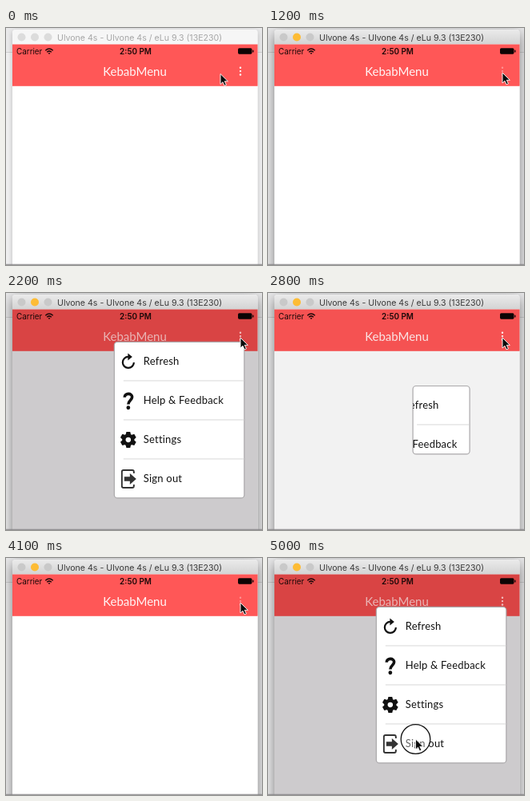
Animation, 320 px wide and 297 px high, one loop 5.1 s. Source, as an HTML page:

```html
<!DOCTYPE html>
<html lang="en">
<head>
<meta charset="utf-8">
<title>KebabMenu</title>
<style>
  html, body { margin: 0; width: 100%; height: 100%; overflow: hidden; background: #efeff0; }
  #stage { display: block; width: 100vw; height: 100vh; }
  .ui { font-family: Inter, "Liberation Sans", sans-serif; }
  .app { font-family: Lato, "Open Sans", sans-serif; }
</style>
</head>
<body>
<svg id="stage" viewBox="0 0 320 297" preserveAspectRatio="none">
  <defs>
    <linearGradient id="bar" x2="0" y2="1">
      <stop offset="0" stop-color="#ebebeb"/>
      <stop offset="1" stop-color="#d3d3d3"/>
    </linearGradient>
  </defs>

  <rect width="320" height="297" fill="#efeff0"/>
  <rect width="320" height="30" fill="#e9e9ea"/>
  <path d="M0 30.5H320" stroke="#cfcfd0"/>
  <path id="frame" d="M8 320V6Q8 2 12 2H310.500Q314.500 2 314.500 6V320Z" fill="#f6f6f6"/>
  <path id="titlebar" d="M8 20.500V6Q8 2 12 2H310.500Q314.500 2 314.500 6V20.500Z" fill="#f6f6f6"/>
  <g id="lights">
    <circle cx="19.500" cy="11.500" r="5"/>
    <circle id="mid" cx="36" cy="11.500" r="5"/>
    <circle cx="52.500" cy="11.500" r="5"/>
  </g>
  <text id="caption" class="ui" x="64" y="15.500" font-size="10.600">Ulvone 4s - Ulvone 4s / eLu 9.3 (13E230)</text>

  <rect id="page" x="8" y="72" width="306.500" height="225"/>
  <rect id="nav" x="8" y="20.500" width="306.500" height="52.300"/>
  <g class="ui" font-size="9.900" fill="#1a0808">
    <text x="13" y="32.500">Carrier</text>
    <text x="162" y="32.500" text-anchor="middle" font-weight="600">2:50 PM</text>
  </g>
  <g fill="none" stroke="#1a0808" stroke-width="1.500">
    <path d="M49.300 28.200Q54 23.800 58.700 28.200"/>
    <path d="M51.200 30.200Q54 27.600 56.800 30.200"/>
  </g>
  <path d="M52.600 31.600Q54 30.300 55.400 31.600L54 33Z" fill="#1a0808"/>
  <rect x="290" y="25.300" width="17.500" height="7.400" rx="1.600" fill="#0c0404"/>
  <rect x="308.200" y="27.500" width="1.300" height="3" rx=".6" fill="#0c0404"/>
  <text id="heading" class="app" x="161" y="60" font-size="15" text-anchor="middle">KebabMenu</text>
  <g id="dots" fill="#fff">
    <circle cx="293" cy="49.700" r="1.200"/>
    <circle cx="293" cy="54.100" r="1.200"/>
    <circle cx="293" cy="58.500" r="1.200"/>
  </g>

  <rect id="edge" rx="4" fill="#fff" stroke="#aaa8aa" stroke-width="1.200"/>
  <svg id="pop">
    <g id="rows"></g>
  </svg>

  <circle id="ring" fill="#fff" fill-opacity=".35" stroke="#111" stroke-width="1.300"/>
  <path id="cursor" d="M0 0V13L3 10.200L5 14.800L7.400 13.800L5.300 9.300H9.400Z"
        fill="#0a0a0a" stroke="#fff" stroke-width=".9" stroke-linejoin="round"/>
  <path d="M0 296.300H320" stroke="#858486" stroke-width="1"/>
</svg>

<script>
const LOOP = 5100, STEP = 100;
const BOX = { cx: 216.6, cy: 159.2, w: 162.5, h: 195.5 };
const ROW = 49, MIN_SCALE = 0.24;

const $ = id => document.getElementById(id);
const set = (el, attrs) => { for (const k in attrs) el.setAttribute(k, attrs[k]); };
const clamp = v => Math.max(0, Math.min(1, v));
const lerp = (a, b, p) => a + (b - a) * p;
const span = (t, a, b) => clamp((t - a) / (b - a));
const inOut = p => p * p * (3 - 2 * p);
const out = p => 1 - Math.pow(1 - p, 4.8);
const mix = (a, b, p) => `rgb(${a.map((v, i) => Math.round(lerp(v, b[i], p)))})`;
const within = (t, a, b) => t >= a && t < b;

const tooth = [0, 60, 120, 180, 240, 300]
  .map(a => `<path d="M-3.400 -6L-2.400 -10H2.400L3.400 -6Z" transform="rotate(${a})"/>`).join('');

// squeeze: how far a row slides left while the panel is narrow
const items = [
  { label: 'Refresh', squeeze: 1, icon:
    `<path d="M7 1A7 7 0 1 1 0 -6" fill="none" stroke="#111" stroke-width="2.200"/>
     <path d="M-.5 -10.500L5 -6L-.5 -1.500Z"/>` },
  { label: 'Help &amp; Feedback', squeeze: 12, icon:
    `<path d="M-4.600 -4.200C-4.600 -10 4.800 -10 4.800 -4.600C4.800 -.6 0 -.2 0 4.600" fill="none" stroke="#111" stroke-width="3.600"/>
     <circle cy="8.800" r="2.400"/>` },
  { label: 'Settings', squeeze: 2, icon:
    `<circle r="5.400" fill="none" stroke="#111" stroke-width="4.200"/>${tooth}` },
  { label: 'Sign out', squeeze: 1, icon:
    `<path d="M7 -7V-9Q7 -11 5 -11H-6Q-8 -11 -8 -9V9Q-8 11 -6 11H5Q7 11 7 9V7" fill="none" stroke="#333" stroke-width="1.900"/>
     <path d="M-5 -2.700H2V-7L10 0L2 7V2.700H-5Z" fill="#333"/>` }
];

$('rows').innerHTML = items.map((it, i) => `
  <g class="row" fill="#111">
    <g transform="translate(17.500 ${24.5 + i * ROW})">${it.icon}</g>
    <text class="app" x="36.500" y="${29 + i * ROW}" font-size="13" letter-spacing=".2">${it.label}</text>
  </g>` + (i < 3 ? `<path class="rule" stroke="#d4d3d4" stroke-width=".9"/>` : '')).join('');
const rows = [...document.querySelectorAll('.row')];
const rules = [...document.querySelectorAll('.rule')];

function openness(t) {
  if (t < 2600) return out(span(t, 1200, 1600));
  if (t < 4000) return 1 - inOut(span(t, 2600, 2900));
  return out(span(t, 4100, 4500));
}

function drawWindow(active) {
  set($('frame'), { style: active
    ? 'filter:drop-shadow(0 5px 8px rgba(0,0,0,.5))'
    : 'filter:drop-shadow(0 2px 3px rgba(0,0,0,.22))' });
  set($('titlebar'), { fill: active ? 'url(#bar)' : '#f6f6f6' });
  set($('lights'), { fill: active ? '#c9c9c9' : '#dcdcdc' });
  set($('mid'), { fill: active ? '#fdbc35' : '#dcdcdc' });
  set($('caption'), { fill: active ? '#3a3a3a' : '#a6a6a6' });
}

function drawMenu(p) {
  const s = lerp(MIN_SCALE, 1, p);
  const w = BOX.w * s, h = BOX.h * s;
  const x = BOX.cx - w / 2, y = BOX.cy - h / 2;
  const display = p > 0.01 ? 'inline' : 'none';
  set($('edge'), { x, y, width: w, height: h, display });
  set($('pop'), { x, y, width: w, height: h, display });

  const left = (BOX.w - w) / 2;
  rows.forEach((row, i) => {
    const dx = -left - items[i].squeeze * (1 - s) / 0.19;
    set(row, { transform: `translate(${dx} 0)` });
  });
  rules.forEach((rule, i) => set(rule, { d: `M${11.5 * s} ${48.5 + i * ROW}H${w}` }));

  set($('nav'), { fill: mix([255, 87, 87], [217, 68, 68], p) });
  set($('page'), { fill: mix([255, 255, 255], [205, 203, 205], p) });
  set($('heading'), { fill: mix([255, 246, 246], [233, 180, 180], p) });
}

function drawPointer(t) {
  const a = inOut(span(t, 100, 700));
  const b = inOut(span(t, 4300, 4800));
  const x = lerp(lerp(268, 293, a), 184.5, b);
  const y = lerp(lerp(57.5, 56, a), 227, b);
  set($('cursor'), { transform: `translate(${x} ${y})` });
  set($('ring'), { cx: x, cy: y, r: lerp(13, 18.3, span(t, 4900, 5000)),
    display: t >= 4900 ? 'inline' : 'none' });
}

function draw(t) {
  const p = openness(t);
  const pressed = within(t, 1000, 1300) || within(t, 4000, 4300);
  drawWindow(t >= 800);
  drawMenu(p);
  set($('dots'), { opacity: pressed ? 0.35 : 1 - 0.35 * p });
  drawPointer(t);
}

const start = performance.now();
function tick() {
  const t = (performance.now() - start) % LOOP;
  draw(Math.floor(t / STEP) * STEP);
  requestAnimationFrame(tick);
}
tick();
</script>
</body>
</html>
```
